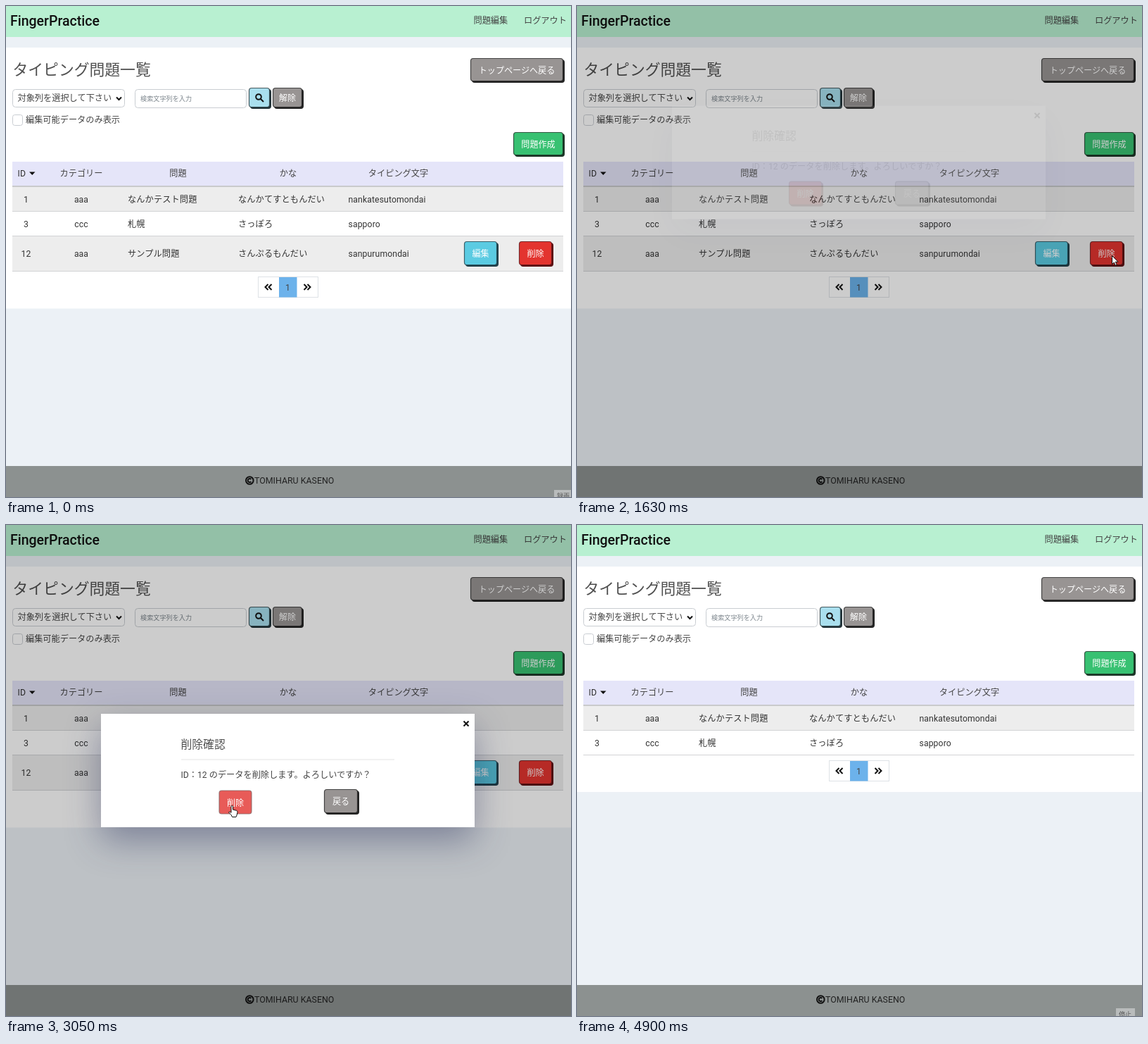
Animation of 803 by 697 pixels, one loop 4970 ms. Source, as an HTML page:

```html
<!DOCTYPE html>
<html lang="ja">
<head>
<meta charset="utf-8">
<style>
html, body { margin: 0; width: 803px; height: 697px; overflow: hidden; background: #ecf1f6; }
svg { display: block; font: 12.2px Roboto, "Noto Sans CJK JP Light", "Noto Sans CJK JP DemiLight", "Noto Sans CJK JP", sans-serif; fill: #444; }
.mid { text-anchor: middle; }
.white { fill: #fff; }
.latin { letter-spacing: .12px; fill: #333; }
.face { stroke-opacity: .8; stroke-width: 1.2; }
.hot .face { fill: #e85b58; }
.down { transform: translate(1.5px, 1.5px); }
.down .shade { display: none; }
.down .face { stroke: #866; }
.dialog { fill: #fff; filter: drop-shadow(0 19px 25px rgba(20, 30, 80, .38)); }
.line { fill: none; stroke: #111; stroke-width: 2; }
</style>
</head>
<body>
<svg id="stage" width="803" height="697" viewBox="0 0 803 697"></svg>
<script>
const LOOP = 4970, STEP = 66.7;

const rect = (x, y, w, h, fill, extra = '') =>
  `<rect x="${x}" y="${y}" width="${w}" height="${h}" fill="${fill}" ${extra}/>`;
// Text is placed by its vertical centre.
const text = (x, y, s, extra = '', size = 12.2) =>
  `<text x="${x}" y="${y + size * .37}" font-size="${size}" ${extra}>${s}</text>`;
const mid = (x, y, s) => text(x, y, s, 'class="mid"');
const button = (x, y, w, h, fill, dark, label = '', id = '') =>
  `<g id="${id}">${rect(x + 2, y + 2, w - 2, h - 2, dark, 'rx="4" class="shade"')}
  ${rect(x + .5, y + .5, w - 3, h - 3, fill, `rx="3.5" stroke="${dark}" class="face"`)}
  <text class="mid white" x="${x + w / 2 - 1}" y="${y + h / 2 + 4}" font-size="12.1">${label}</text></g>`;
const field = (x, y, w, h, r = 4) =>
  rect(x + .5, y + .5, w - 1, h - 1, '#fff', `rx="${r}" stroke="#c9cdd2"`);
const row = (y, cells) => cells.map((s, i) =>
  text([28.5, 107, 173, 330, 486.5][i], y, s, `class="${i < 2 ? 'mid ' : ''}latin"`)).join('');

const GRAY = '#989493', RED = '#e3342f', INK = '#242424', MAROON = '#5c1214';

const page = `
${rect(0, 0, 803, 697, '#ecf1f6')}
${rect(0, 0, 803, 44, '#b8f0d1')}
${text(6, 20.5, 'FingerPractice', 'font-weight="500" fill="#111"', 19.5)}
${text(664.5, 20, '問題編集')}${text(736, 20, 'ログアウト')}
<rect id="panel" y="59" width="803" fill="#fff"/>
${text(9.5, 90, 'タイピング問題一覧', 'fill="#505050"', 21.8)}
${button(660, 74, 134, 35, GRAY, INK, 'トップページへ戻る')}
${field(9, 118, 160, 26)}${text(16.5, 130.5, '対象列を選択して下さい')}
<path class="line" d="M157 129.5l3.5 3.5 3.5-3.5"/>
${field(183, 118, 159, 27)}${text(191, 131.5, '検索文字列を入力', 'fill="#7c858c"', 9.15)}
${button(345, 116, 32, 30, '#a9dfee', '#23343a')}
<circle class="line" cx="359" cy="129" r="3.8"/><path class="line" d="M362 132l4 4"/>
${button(379, 116, 44, 30, GRAY, INK, '解除')}
${field(9, 154, 15, 16, 3)}${text(28, 161.5, '編集可能データのみ表示')}
${button(721, 179, 73, 35, '#38c172', '#1d3527', '問題作成')}
${rect(9, 221, 783, 34, '#e5e5f9')}${rect(9, 255, 783, 2, '#c9cacc')}
${text(16.5, 237.5, 'ID', 'class="latin"')}<path d="M33 235.5h8.500l-4.250 4.500z" fill="#111"/>
${mid(107, 237.5, 'カテゴリー')}${mid(244.5, 237.5, '問題')}
${mid(401, 237.5, 'かな')}${mid(557.5, 237.5, 'タイピング文字')}
${rect(9, 257, 783, 34, '#ededed')}${rect(9, 291, 783, 1, '#d2d3d5')}${rect(9, 326, 783, 1, '#d2d3d5')}
${row(274, ['1', 'aaa', 'なんかテスト問題', 'なんかてすともんだい', 'nankatesutomondai'])}
${row(309, ['3', 'ccc', '札幌', 'さっぽろ', 'sapporo'])}
<g id="lastRow">
${rect(9, 327, 783, 49, '#ededed')}${rect(9, 376, 783, 1, '#d2d3d5')}
${row(351.5, ['12', 'aaa', 'サンプル問題', 'さんぷるもんだい', 'sanpurumondai'])}
${button(651, 334, 49, 36, '#5bcbe2', '#22414b', '編集')}
${button(729, 334, 49, 36, RED, MAROON, '削除', 'rowDelete')}
</g>
<g id="pager">
${rect(358.5, 384.5, 85, 29, '#fff', 'stroke="#dee2e6"')}${rect(388, 385, 25.5, 28.5, '#6cb2eb')}
${mid(400.5, 399, '1')}
<path class="line" d="M372.5 395l-4 4 4 4M377.5 395l-4 4 4 4M423.5 395l4 4-4 4M428.5 395l4 4-4 4"/>
</g>
${rect(0, 653, 803, 44, '#8c9190')}
<circle cx="346.3" cy="673.5" r="5.3" class="line"/>
<path class="line" d="M348.3 671.8a2.6 2.6 0 1 0 0 3.4"/>
${text(353, 673.5, 'TOMIHARU KASENO', 'fill="#222"', 12.4)}`;

const modal = `
<rect id="backdrop" width="803" height="697" fill="#000"/>
<g id="modal">
${rect(135, 268, 531, 161, '#fff', 'class="dialog"')}
<path class="line" d="M650.5 278.5l7 7m0-7l-7 7"/>
${text(248.5, 311, '削除確認', 'fill="#505050"', 15.8)}${rect(249, 332.5, 303, 1, '#e4e4e4')}
${text(248.5, 354, 'ID：12 のデータを削除します。よろしいですか？')}
${button(301, 375, 49, 36, RED, MAROON, '削除', 'modalDelete')}
${button(452, 375, 50, 36, GRAY, INK, '戻る')}
</g>`;

const badge = (id, x, y, label) =>
  `<g id="${id}">${rect(x, y, 27, 14, '#b9bcbc')}${text(x + 4, y + 8.5, label, 'fill="#555"', 9)}</g>`;

const overlay = `
${badge('recordTip', 779, 687, '録画')}${badge('stopTip', 766, 686, '停止')}
<g id="cursor" fill="#fff" stroke="#111" stroke-linejoin="round">
<path id="arrow" d="M.5.5v12l2.8-2.5 1.9 4.3 2-.9-1.9-4.2h3.7z"/>
<path id="hand" d="M3 1q1.5-1.5 2.5 0v5l5 1.3q1.5.5 1.5 2.2l-1 4.5-1 2.5h-5.5l-1.5-3-3.5-3.5q.5-1.5 2-.7l1.5 1z"/>
</g>`;

stage.innerHTML = page + modal + overlay;
const $ = id => document.getElementById(id);
const set = (id, name, value) => $(id).setAttribute(name, value);
const show = (id, on) => set(id, 'display', on ? 'inline' : 'none');
const clamp = v => Math.min(1, Math.max(0, v));
const easeOut = v => 1 - (1 - clamp(v)) ** 2;
const easeIn = v => clamp(v) ** 2;

// time, x, y of the pointer tip
const path = [
  [363, 776, 672], [830, 730, 415], [1230, 760, 354], [1760, 760, 354],
  [2031, 494, 368], [2364, 311, 404], [2640, 311, 404], [2641, 317, 398],
  [3400, 317, 398], [3765, 428, 468], [3832, 455, 485], [3899, 488, 512],
  [3966, 551, 554], [4099, 628, 610], [4365, 741, 697]
];

function pointer(t) {
  const i = Math.max(1, path.findIndex(p => p[0] >= t));
  const [a, b] = [path[i - 1], path[i]];
  const k = clamp((t - a[0]) / (b[0] - a[0]));
  return [a[1] + (b[1] - a[1]) * k, a[2] + (b[2] - a[2]) * k].map(Math.round);
}

function draw(now) {
  const t = now % LOOP;
  const held = (Math.floor(t / STEP - .05) + .45) * STEP; // 15 pictures a second
  const within = (a, b) => t >= a && t < b;

  const removed = t >= 3400;
  set('panel', 'height', removed ? 320 : 370.5);
  set('pager', 'transform', `translate(0 ${removed ? -50 : 0})`);
  show('lastRow', !removed);

  set('rowDelete', 'class', within(1500, 1604) ? 'hot down' : within(1130, 1604) ? 'hot' : '');
  set('modalDelete', 'class', within(3050, 3130) ? 'hot down' : within(2300, 3600) ? 'hot' : '');

  const opening = held < 3000;
  const shade = t < 1604 ? 0 : .2 * clamp((3318 - held) / 50);
  const fade = clamp((opening ? held - 1618 : 3443 - held) / 150);
  const lift = opening ? 1 - easeOut((held - 1618) / 300) : easeIn((held - 3293) / 300);
  set('backdrop', 'opacity', shade);
  set('modal', 'opacity', fade);
  set('modal', 'transform', `translate(0 ${-138 * lift})`);
  show('modal', fade > 0);

  show('recordTip', t < 70);
  show('stopTip', t >= 4900);
  show('cursor', within(340, 4370));
  const hand = within(2645, 3405);
  show('hand', hand);
  show('arrow', !hand);
  set('cursor', 'transform', `translate(${pointer(Math.min(held, 4365))})`);
}

const start = performance.now();
(function frame() {
  draw(performance.now() - start);
  requestAnimationFrame(frame);
})();
</script>
</body>
</html>
```
